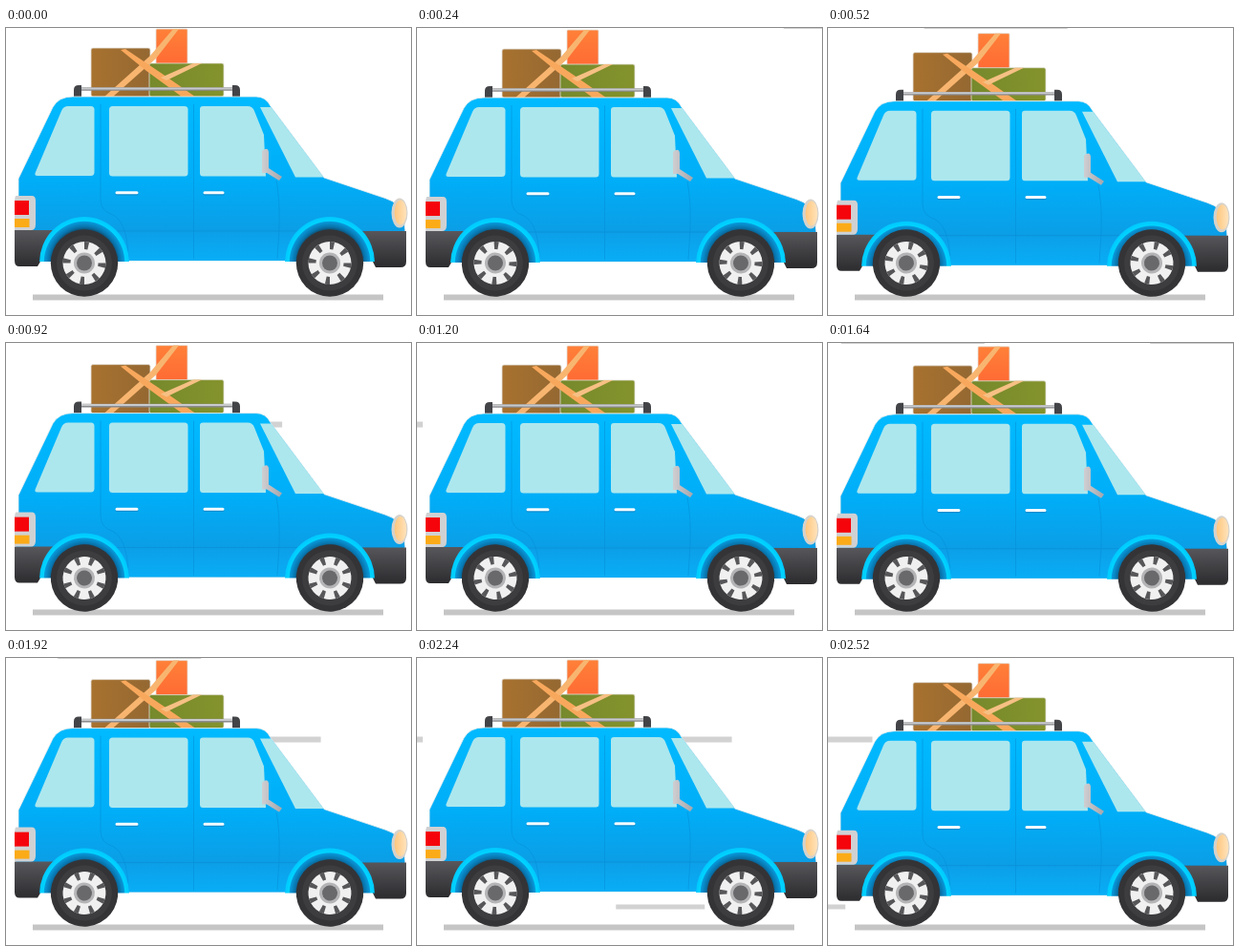
An HTML page that plays this animation: 424x301 px, repeating every 2.56 s.

```html
<!DOCTYPE html>
<html lang="en">
<head>
<meta charset="utf-8">
<title>Car on the road</title>
<style>
  html, body { margin: 0; width: 100%; height: 100%; overflow: hidden; background: #fff; }
  svg { display: block; width: 424px; height: 301px; }
</style>
</head>
<body>
<svg viewBox="0 0 424 301">
  <defs>
    <linearGradient id="paint" x2="0" y2="1">
      <stop offset="0" stop-color="#00baff"/><stop offset=".5" stop-color="#00aef8"/><stop offset=".82" stop-color="#0b9ee6"/>
    </linearGradient>
    <linearGradient id="sill" x2="0" y2="1">
      <stop offset="0" stop-color="#0c9fe8"/><stop offset="1" stop-color="#08aef6"/>
    </linearGradient>
    <radialGradient id="well">
      <stop offset=".7" stop-color="#12445f"/><stop offset=".78" stop-color="#0873ab"/><stop offset=".89" stop-color="#0898da"/>
      <stop offset=".91" stop-color="#00d4ff"/><stop offset="1" stop-color="#00c8ff"/>
    </radialGradient>
    <linearGradient id="rubber" x2="0" y2="1">
      <stop offset="0" stop-color="#58585c"/><stop offset="1" stop-color="#2b2b2e"/>
    </linearGradient>
    <linearGradient id="brown"><stop offset="0" stop-color="#a8722f"/><stop offset="1" stop-color="#946832"/></linearGradient>
    <linearGradient id="olive"><stop offset="0" stop-color="#76892c"/><stop offset="1" stop-color="#84932c"/></linearGradient>
    <linearGradient id="orange" x2="0" y2="1"><stop offset="0" stop-color="#ff8038"/><stop offset="1" stop-color="#ff6a34"/></linearGradient>
    <linearGradient id="lamp"><stop offset="0" stop-color="#ffc67c"/><stop offset="1" stop-color="#ffe3bc"/></linearGradient>
    <linearGradient id="metal"><stop offset="0" stop-color="#cfcfd2"/><stop offset="1" stop-color="#a6a6ac"/></linearGradient>
    <clipPath id="aboveSill"><path d="M0 0H424V245H0Z"/></clipPath>
    <ellipse id="arch" rx="47" ry="48" fill="url(#well)"/>
    <g id="wheel">
      <circle r="35.2" fill="#343437"/>
      <circle r="29" fill="#3d3d40"/>
      <circle r="22.5" fill="#f0f0f0"/>
      <circle r="18.5" fill="none" stroke="#57575a" stroke-width="8" pathLength="16" stroke-dasharray=".6 1.4"/>
      <circle r="11" fill="#b4b4b6"/>
      <circle r="8" fill="#69696c"/>
    </g>
  </defs>

  <g id="wind" fill="#d2d2d2"></g>
  <path d="M28 279.5H395V285.5H28Z" fill="#c5c5c5"/>

  <g id="body">
    <g stroke="#e4e0d8" stroke-width=".8">
      <rect x="89" y="21" width="62" height="51" rx="2" fill="url(#brown)"/>
      <rect x="157" y="1" width="33" height="38" rx="1" fill="url(#orange)"/>
      <rect x="150" y="37" width="78" height="35" rx="2" fill="url(#olive)"/>
    </g>
    <path d="M103 72L151 29L175 1H181L157 32L112 72Z" fill="#f8b570"/>
    <path d="M120 23L125 22L165 49L198 72H184L147 45Z" fill="#f8a85c"/>
    <path d="M162 52L196 37H205L168 55Z" fill="#f6c084"/>
    <path d="M76 64H241" stroke="#8a8a8e" stroke-width="3.6"/>
    <path d="M76 63.5H241" stroke="#c8cacc" stroke-width="2"/>
    <path d="M71 73V65Q71 60 76 60H79V73ZM245 73V65Q245 60 240 60H237V73Z" fill="#434448"/>

    <path d="M70 72H262Q272 72 277 82L333 157L397 178.5Q413 184 416 195L418 213L375 244H40L10 214V181L13 176V158L49 83Q55 72 70 72Z"
          fill="url(#paint)" stroke="#eee" stroke-width=".8"/>
    <path d="M40 213H400L375 244H40Z" fill="url(#sill)"/>
    <path d="M40 213H400" stroke="#0a93da" fill="none"/>
    <path d="M99 80V180Q99 192 112 196Q127 204 128 240M196.5 80V242M283 160Q287 180 286 210L284 242"
          fill="none" stroke="#078ed8" stroke-opacity=".55"/>
    <g fill="#ace7ee">
      <path d="M65 82H89Q92.5 82 92.5 85.5V151Q92.5 155 89 155H33Q29 155 31 151L58 87Q60 82 65 82Z"/>
      <rect x="108" y="82" width="82.5" height="73.5" rx="3.5"/>
      <path d="M206 82H253Q258 82 260 87L270 112L272 155.5H206Q203 155.5 203 152V85Q203 82 206 82Z"/>
      <path d="M266 83H277.5L332.5 156.5H303Z"/>
    </g>
    <path d="M268 129Q274 124 275 130V147L289 156L286 160L273 152H268Z" fill="url(#metal)"/>
    <g stroke-linecap="round" stroke-width="3">
      <path d="M116 174H137M208 174H227" stroke="#0a8cd0"/>
      <path d="M116 172.7H137M208 172.7H227" stroke="#f4fbff"/>
    </g>

    <path d="M9 212H52L36 245L33 250H14Q9 250 9 244ZM372 213H419V245Q419 251 413 251H387L384 245Z" fill="url(#rubber)"/>
    <g clip-path="url(#aboveSill)">
      <use href="#arch" x="82" y="246"/>
      <use href="#arch" x="339" y="246"/>
    </g>
    <path d="M10 176H27Q31 176 31 181V206Q31 212 26 212H9V180Z" fill="#d0d1d3"/>
    <path d="M9 181H24V196H9Z" fill="#f5050b"/>
    <path d="M9 200H24.5V209H9Z" fill="#fbab18"/>
    <ellipse cx="412" cy="194" rx="8.5" ry="15.5" fill="#d6d2cb"/>
    <ellipse cx="413" cy="193.5" rx="6.3" ry="13" fill="url(#lamp)"/>
  </g>

  <g class="wheel" data-x="82"><use href="#wheel"/></g>
  <g class="wheel" data-x="339"><use href="#wheel"/></g>
</svg>
<script>
const LOOP = 2560, STEP = 40, SPEED = 1.011;
const body = document.getElementById('body');
const wind = document.getElementById('wind');
const wheels = document.querySelectorAll('.wheel');

// [phase of the one-second bounce, drop in px]
const bounce = [[0, 0], [.2, 2], [.25, .8], [.5, 5], [.64, 2.8], [.92, 1.6], [1, 0]];

// y, length, height, and the moments when the right end leaves the stage
const gusts = [
  { y: -5, length: 150, height: 6, exits: [768, 1802, 2122] },
  { y: 82.5, length: 120, height: 6, exits: [1206, 2246, 2566] },
  { y: 258.5, length: 93, height: 5, exits: [2538] }
];

const bars = gusts.flatMap(({ y, length, height, exits }) => exits.map(exit => {
  const node = document.createElementNS('http://www.w3.org/2000/svg', 'rect');
  const attrs = { y, width: length, height };
  for (const name in attrs) node.setAttribute(name, attrs[name]);
  wind.append(node);
  return { node, exit, length };
}));

function drop(phase) {
  const i = bounce.findIndex(([p]) => p > phase);
  const [p0, y0] = bounce[i - 1], [p1, y1] = bounce[i];
  return y0 + (y1 - y0) * (phase - p0) / (p1 - p0);
}

function draw(now) {
  const t = Math.floor(now % LOOP / STEP) * STEP;
  body.setAttribute('transform', `translate(0 ${drop(t % 1000 / 1000)})`);
  for (const wheel of wheels)
    wheel.setAttribute('transform', `translate(${wheel.dataset.x} 246.5) rotate(${t * .36})`);
  for (const { node, exit, length } of bars)
    node.setAttribute('x', (exit - t) * SPEED - length);
  requestAnimationFrame(draw);
}
draw(0);
</script>
</body>
</html>
```
